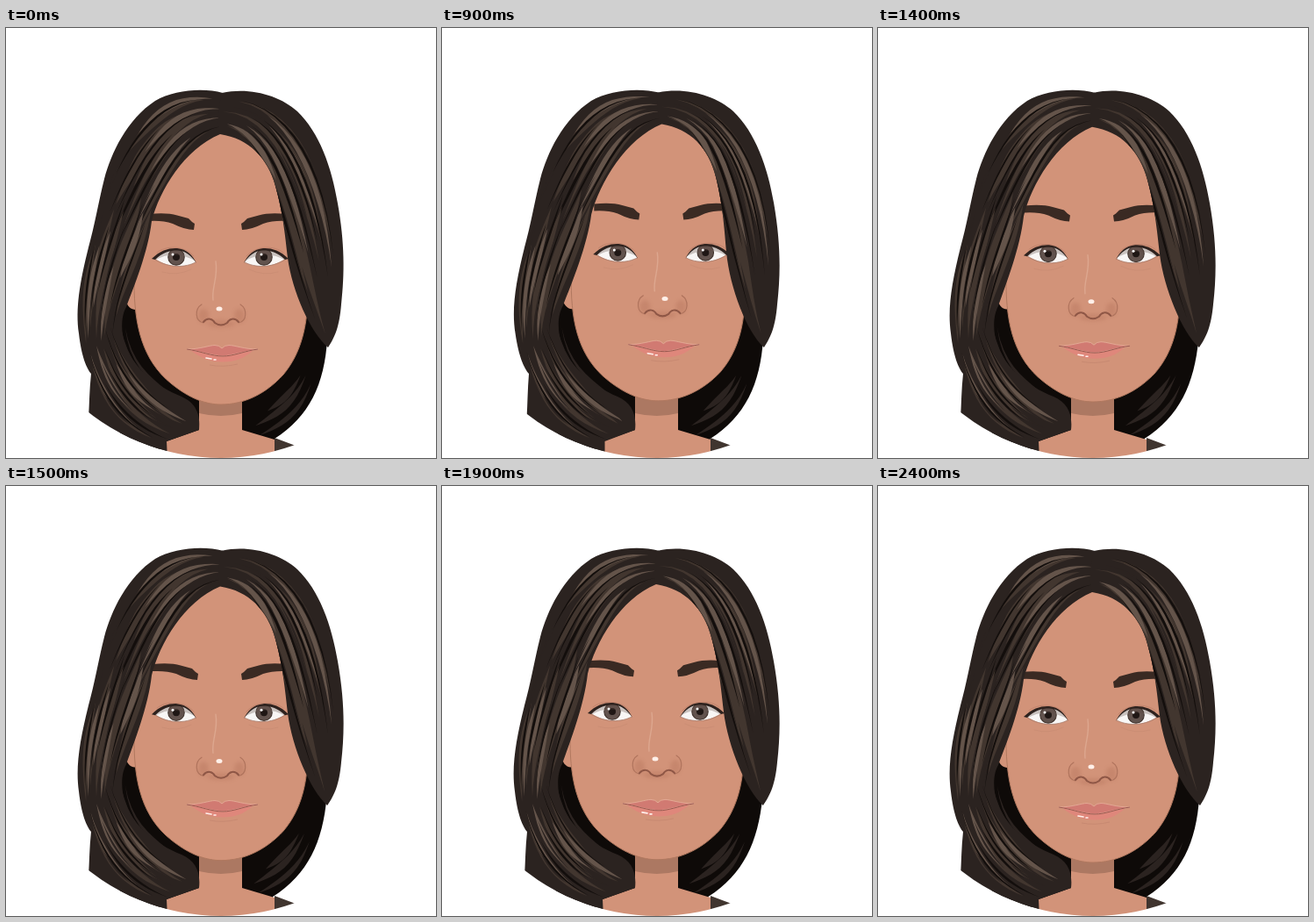
An HTML page that plays this animation: 490 px wide and 490 px high, repeating every 2.5 s.

```html
<!DOCTYPE html>
<html lang="en">
<head>
<meta charset="utf-8">
<title>Nodding portrait</title>
<style>
html, body { margin: 0; width: 100%; height: 100%; overflow: hidden; background: #fff; }
svg { display: block; width: 100vw; height: 100vh; }
</style>
</head>
<body>
<svg viewBox="0 0 490 490">
  <defs>
    <clipPath id="disc"><circle cx="245" cy="245" r="245"/></clipPath>
    <clipPath id="clipBack"><path data-hair="Back"/></clipPath>
    <clipPath id="clipLeft"><path data-hair="Left"/></clipPath>
    <clipPath id="clipRight"><path data-hair="Right"/></clipPath>
    <clipPath id="lids"><path d="M170,263 C178,254 187,252 195,252 C205,253 213,260 216,267 C205,273 186,274 170,263Z"/></clipPath>
    <filter id="soft" x="-50%" y="-50%" width="200%" height="200%"><feGaussianBlur stdDeviation="2"/></filter>
    <g id="eye" fill="none" stroke-linecap="round">
      <path d="M178,278 Q195,283 211,275" stroke="#c38770" opacity=".5"/>
      <path d="M172,256 C181,248 203,247 214,260" stroke="#b87d67" opacity=".7"/>
      <g clip-path="url(#lids)">
        <path d="M160,245 H225 V280 H160Z" fill="#f8f6f5"/>
        <circle cx="194" cy="261" r="9.200" fill="#62534e" stroke="#463933" stroke-width="1.200"/>
        <circle cx="194" cy="261" r="4" fill="#1f1715"/>
        <path d="M165,268 Q190,249 220,268 V245 H165Z" fill="#5d4a43" opacity=".3"/>
      </g>
      <path d="M170,264 C186,274 205,273 216,267" stroke="#a87c6b" stroke-width=".8"/>
      <path d="M166,263 C176,253 186,250.500 195,251 C206,252 213,259 217,268 C211,259 204,253.500 195,253.500 C186,253.500 178,256 170,264Z" fill="#2e221e"/>
    </g>
    <path id="brow" fill="#3a2a23" d="M163,212 C176,210.500 187,211 195,213.500 L208,217 L212,221 L215,223 L214,230 Q204,230 190,223 Q178,219 163,220Z"/>
  </defs>
  <g clip-path="url(#disc)">
    <path data-hair="Back" fill="#0e0a08"/>
    <g id="locksBack" clip-path="url(#clipBack)"></g>
    <path fill="#d29379" d="M220,405 H269 V458 L306,469 V490 H183 V471 L220,458Z"/>
    <path fill="#ac7862" d="M220,410 H269 V439 Q245,445 220,439Z"/>
    <path fill="#40352f" d="M183,470 L165,477 L176,490 L184,490Z M306,467 L330,476 L306,490Z"/>
    <g id="face">
      <ellipse cx="147" cy="306" rx="11" ry="15" fill="#d29379"/>
      <path fill="#d29379" stroke="#b0785f" d="M146,290 C146,340 156,379 188,405 C210,423 229,429 245,429 C271,429 296,417 316,395 C336,371 344,340 344,300 L330,130 L245,92 L160,150Z"/>
    </g>
    <g id="eyes">
      <use href="#eye"/>
      <use href="#eye" transform="translate(488 0) scale(-1 1)"/>
      <circle cx="190" cy="258" r="1.500" fill="#fff"/>
      <circle cx="291" cy="258" r="1.500" fill="#fff"/>
    </g>
    <use href="#brow" id="browL"/>
    <use href="#brow" id="browR"/>
    <g id="nose" fill="none" stroke-linecap="round">
      <path d="M239,266 C242,284 234,296 236,310" stroke="#dda78f" stroke-width="1.400"/>
      <g filter="url(#soft)" fill="#b8775f" opacity=".45">
        <ellipse cx="225" cy="328" rx="6" ry="8"/><ellipse cx="266" cy="328" rx="6" ry="8"/>
        <ellipse cx="245" cy="337" rx="16" ry="4"/>
      </g>
      <path d="M223,315 C215,320 215,334 225,336 M267,315 C275,320 275,334 265,336" stroke="#b0745d" stroke-width="1.200"/>
      <path d="M225,335 C230,329 236,332 238,336 Q245,341 252,336 C254,332 260,329 265,335" stroke="#8f5746" stroke-width="2"/>
    </g>
    <ellipse id="shine" cx="243" cy="320" rx="3.500" ry="2.500" fill="#fff0e9"/>
    <g id="mouth">
      <path d="M232,384 Q247,387 264,383" fill="none" stroke="#c0836d" opacity=".6"/>
      <path fill="#df877b" d="M210,367 Q246,375 282,367 C271,377 261,380.500 247,380.500 C233,380.500 222,376 210,367Z"/>
      <path fill="#d17a72" stroke="#e7b09c" stroke-width=".8" d="M206,366 C221,366 232,361.500 238,361.500 Q243,361.500 246,365 Q249,361.500 254,361.500 C261,361.500 271,366 287,366 C270,369 258,373 247,374 C235,373 222,369 206,366Z"/>
      <path d="M206,366 C220,368 235,374 247,374 S272,368 287,366" fill="none" stroke="#98574e"/>
      <path d="M228,376 L234,377 M237,378 L239,378" stroke="#fff1ec" stroke-width="1.600" stroke-linecap="round"/>
    </g>
    <path data-hair="Left" fill="#2b2320"/>
    <g id="locksLeft" clip-path="url(#clipLeft)"></g>
    <path data-hair="Right" fill="#2b2320"/>
    <g id="locksRight" clip-path="url(#clipRight)"></g>
  </g>
</svg>
<script>
const $ = id => document.getElementById(id);
const clamp = v => Math.max(0, Math.min(1, v));
const mix = (a, b, f) => a + (b - a) * f;

const outline = {
  Back: 'M130,300 L130,480 L225,480 L225,400 L266,400 L266,482 L306,482 L306,468 C346,443 363,405 366,355 L340,270Z',
  Left: 'M247,74 C226,68 192,70 170,83 C138,104 120,142 112,172 C105,200 101,225 94,250 ' +
    'C84,290 79,320 83,348 C86,375 92,388 97,394 C95,412 95,428 94,445 L140,490 L183,490 L183,471 ' +
    'L220,458 C222,440 216,427 200,420 C170,408 140,385 133,350 C131,335 133,325 137,318 ' +
    'C146,294 162,255 166,220 C175,185 203,138 244,121 C248,112 250,95 247,74Z',
  Right: 'M246,74 C278,67 312,77 332,95 C357,119 371,158 378,200 C386,245 386,280 382,315 ' +
    'C380,340 375,352 367,364 C347,347 326,300 321,262 C317,225 314,205 307,180 ' +
    'C298,148 277,126 244,121 C240,108 242,90 246,74Z'
};

// Strands flow between two cubic curves; locks are scattered in that flow
const BASE = '#2b2320', DARK = '#130e0c';
const layers = [
  { fill: '#42362f', count: 5, width: 0.085, span: 0.7 },
  { fill: '#64544a', count: 4, width: 0.06, span: 0.5 },
  { fill: BASE, count: 5, width: 0.022, span: 0.4 },
  { fill: DARK, count: 6, width: 0.022, span: 0.65 }
];
const shade = [{ fill: BASE, count: 3, width: 0.12, span: 0.8 }];
const flows = [
  ['Left', layers, '246,114 190,126 172,200 120,300', '246,80 170,62 130,130 106,200'],
  ['Left', layers, '172,195 155,262 118,310 124,390', '116,180 96,240 82,290 88,360'],
  ['Left', layers, '120,330 140,400 175,425 217,445', '88,350 98,420 130,460 180,476'],
  ['Right', layers, '247,114 312,132 308,250 360,356', '247,80 330,70 386,180 377,330'],
  ['Back', shade, '332,390 315,420 295,428 272,442', '354,395 342,440 318,455 290,468'],
  ['Back', shade, '138,340 145,400 190,410 216,440', '120,340 135,410 170,430 210,450']
];

let seed = 11;
const rand = () => (seed = seed * 16807 % 2147483647) / 2147483647;
const points = text => text.split(' ').map(p => p.split(',').map(Number));

function cubic(p, u) {
  const v = 1 - u;
  return [0, 1].map(n => v ** 3 * p[0][n] + 3 * v * v * u * p[1][n] + 3 * v * u * u * p[2][n] + u ** 3 * p[3][n]);
}

function lock(inner, outer, s, from, to, width) {
  const side = sign => Array.from({ length: 13 }, (_, i) => {
    const u = mix(from, to, i / 12), q = s + sign * width * Math.sin(Math.PI * i / 12);
    const a = cubic(inner, u), b = cubic(outer, u);
    return mix(a[0], b[0], q) + ',' + mix(a[1], b[1], q);
  });
  return 'M' + [...side(1), ...side(-1).reverse()].join(' L') + 'Z';
}

const hair = [...document.querySelectorAll('[data-hair]')]
  .map(el => ({ el, d: outline[el.dataset.hair] }));
for (const [part, set, a, b] of flows) {
  const inner = points(a), outer = points(b);
  for (const { fill, count, width, span } of set) {
    let d = '';
    for (let i = 0; i < count; i++) {
      const s = (i + 0.2 + 0.6 * rand()) / count;
      const len = span * mix(0.75, 1.25, rand()), from = (1 - len) * rand();
      d += lock(inner, outer, s, from, from + len, width * mix(0.7, 1.3, rand()));
    }
    const el = document.createElementNS('http://www.w3.org/2000/svg', 'path');
    el.setAttribute('fill', fill);
    $('locks' + part).append(el);
    hair.push({ el, d });
  }
}

// The hairline follows the head, the crown stays, the loose ends sway a little
function bend(d, dx, dy) {
  return d.replace(/(-?[\d.]+),(-?[\d.]+)/g, (_, a, b) => {
    const x = +a, y = +b;
    const r = Math.hypot((x - 245) / 140, (y - 250) / 178);
    const w = clamp((1 - r) / 0.27) * clamp((380 - y) / 240);
    const low = clamp((y - 330) / 80);
    const sway = low * (x < 200 ? dx * 0.4 : x > 280 ? dx * 0.5 + dy * 0.3 : 0);
    return (x + dx * w + sway).toFixed(2) + ',' + (y + dy * w).toFixed(2);
  });
}

const ramp = (t, a, b) => clamp((t - a) / (b - a));
const easeOut = f => 1 - (1 - f) ** 2;
const easeIn = f => f ** 1.5;

function pose(t) {
  const lift = easeOut(ramp(t, 600, 900));
  const turn = 6.3 * (lift - easeIn(ramp(t, 1100, 1400)));
  const first = lift - easeIn(ramp(t, 1100, 1800));
  const second = easeOut(ramp(t, 1700, 2200)) - ramp(t, 2200, 2400);
  const nod = -11.5 * first - 14 * second;
  const brow = nod - 4 * Math.sin(Math.PI * ramp(t, 1300, 2300));
  return { turn, nod, brow };
}

const place = (id, x, y, extra = '') =>
  $(id).setAttribute('transform', `translate(${x} ${y}) ${extra}`);

let last = -1;
function draw(now) {
  const t = Math.floor(now % 2500 / 100) * 100;
  if (t === last) return;
  last = t;
  const { turn, nod, brow } = pose(t);
  const squash = 1 + nod * 0.0028;
  place('face', turn * 0.2, 300 * (1 - squash), `scale(1 ${squash})`);
  place('eyes', turn, nod * 0.44);
  place('browL', turn + Math.min(4, -brow * 0.7), brow);
  place('browR', 483 + turn, brow, 'scale(-1 1)');
  place('nose', turn, nod * 0.88);
  place('shine', turn * 1.75, nod);
  place('mouth', turn, nod * 0.46);
  for (const h of hair) h.el.setAttribute('d', bend(h.d, turn, nod));
}

const start = performance.now();
function tick() {
  draw(performance.now() - start);
  requestAnimationFrame(tick);
}
draw(0);
requestAnimationFrame(tick);
</script>
</body>
</html>
```
